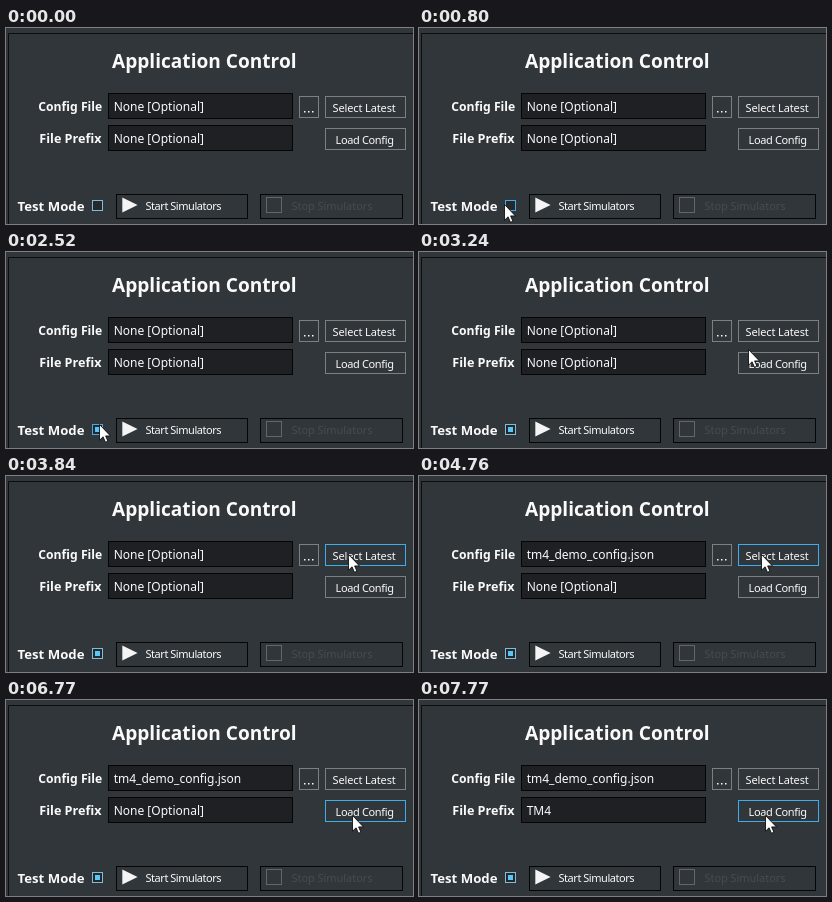
An HTML page that plays this animation: 407 px wide and 196 px high, repeating every 8 s.

```html
<!DOCTYPE html>
<html lang="en">
<head>
<meta charset="utf-8">
<title>Application Control</title>
<style>
html, body { margin: 0; width: 100%; height: 100%; overflow: hidden; background: #31363b; }
svg { display: block; width: 100%; height: 100%; }
text { font-family: "Noto Sans", "Open Sans", sans-serif; fill: #fafafa; white-space: pre; }
.label { font-weight: 700; }
.field { fill: #1e2023; stroke: #050506; }
.button { fill: #31363b; stroke: #7d8083; }
.dark { fill: #31363b; stroke: #050506; }
.hover { stroke: #3daee9; }
</style>
</head>
<body>
<svg viewBox="0 0 407 196" preserveAspectRatio="none">
  <rect width="407" height="196" fill="#31363b"/>
  <path d="M2.5 196V5.5H407" fill="none" stroke="#0c0d0e"/>

  <text class="label" x="106" y="40" font-size="19.1">Application Control</text>
  <text class="label" x="32.3" y="83" font-size="12.2">Config File</text>
  <text class="label" x="33.3" y="115" font-size="12.6">File Prefix</text>
  <text class="label" x="11.5" y="183" font-size="13.2">Test Mode</text>

  <rect class="field" x="102.5" y="65.5" width="184" height="25"/>
  <rect class="field" x="102.5" y="97.5" width="184" height="25"/>
  <text id="config" x="107.7" y="83" font-size="12"></text>
  <text id="prefix" x="107.7" y="115" font-size="12"></text>

  <rect class="button" x="293.5" y="68.5" width="19" height="21"/>
  <path d="M298 83h1.5v1.5h-1.5zM302 83h1.5v1.5h-1.5zM306 83h1.5v1.5h-1.5z" fill="#fafafa"/>
  <rect id="select" class="button" x="319.5" y="68.5" width="80" height="21"/>
  <text id="selectText" x="326.5" y="84" font-size="11" letter-spacing="-.12">Select Latest</text>
  <rect id="load" class="button" x="319.5" y="100.5" width="80" height="21"/>
  <text id="loadText" x="329.5" y="116" font-size="11" letter-spacing="-.36">Load Config</text>

  <rect id="check" x="86.5" y="172.5" width="10" height="10" fill="#25292c" stroke="#7fbcd9"/>
  <rect id="mark" x="89" y="175" width="5" height="5" fill="#5cc3f2"/>

  <rect class="dark" x="110.5" y="166.5" width="131" height="24"/>
  <path d="M116.3 169.4L131.6 177 116.3 184.6Z" fill="#f4f4f4"/>
  <text x="139.5" y="182" font-size="11" letter-spacing="-.46">Start Simulators</text>
  <rect class="dark" x="254.5" y="166.5" width="142" height="24"/>
  <rect x="260.5" y="169.5" width="15" height="15" fill="none" stroke="#63666a"/>
  <text x="285.5" y="182" font-size="11" letter-spacing="-.05" style="fill:#484c4f">Stop Simulators</text>

  <path id="cursor" d="M.5 .5V16.2L4.1 12.8 6.4 18.2 8.9 17.2 6.6 11.9H11.4Z"
        fill="#fff" stroke="#000" stroke-width=".8"/>
  <circle id="halo" r="12" fill="#ff0" fill-opacity=".47"/>
</svg>
<script>
const LOOP = 8000;
const $ = id => document.getElementById(id);
const show = (id, on) => $(id).setAttribute("visibility", on ? "visible" : "hidden");
const smooth = p => p * p * (3 - 2 * p);
const slow = p => 1 - (1 - p) ** 2;

// Cursor moves: start, end, steps, from, to, easing
const moves = [
  [500, 800, 4, [85, 193], [85, 176], slow],
  [900, 900, 1, [87, 175], [87, 175], slow],
  [1200, 1300, 2, [89, 175], [90, 175], slow],
  [2520, 3240, 8, [93, 172], [329, 97], smooth],
  [3340, 3840, 6, [331, 93], [342, 78], slow],
  [6050, 6570, 6, [343, 81], [344, 114], smooth],
  [6770, 6770, 1, [346, 115], [346, 115], slow]
];
const clicks = [[1820, 1920], [4540, 4760], [7670, 7770]];

// The pointer is sampled at about ten positions a second
function pointer(t) {
  const move = moves.filter(m => t >= m[0]).pop();
  if (!move) return null;
  const [start, end, steps, a, b, ease] = move;
  const last = steps - 1;
  const gap = last ? (end - start) / last : 1;
  const k = Math.min(last, Math.floor((t - start) / gap + 1e-6));
  const p = last ? ease(k / last) : 1;
  return a.map((v, i) => Math.round(v + (b[i] - v) * p));
}

function inside(point, id) {
  if (!point) return false;
  const r = $(id), n = name => +r.getAttribute(name);
  const dx = point[0] - n("x"), dy = point[1] - n("y");
  return dx >= -1.5 && dy >= -0.5 && dx <= n("width") + 0.5 && dy <= n("height") + 0.5;
}

function draw(t) {
  const at = pointer(t);
  const pressed = clicks.some(([a, b]) => t >= a && t < b);
  show("cursor", at);
  show("halo", pressed);
  if (at) {
    const shift = `translate(${at})`;
    $("cursor").setAttribute("transform", shift);
    $("halo").setAttribute("transform", shift);
  }
  for (const id of ["check", "select", "load"])
    $(id).classList.toggle("hover", inside(at, id));
  for (const id of ["select", "load"])
    $(id + "Text").setAttribute("transform", pressed && inside(at, id) ? "translate(1 1)" : "");
  show("mark", t >= 1920);
  $("config").textContent = t < 4760 ? "None [Optional]" : "tm4_demo_config.json";
  $("prefix").textContent = t < 7770 ? "None [Optional]" : "TM4";
}

const began = performance.now();
function tick() {
  draw((performance.now() - began) % LOOP);
  requestAnimationFrame(tick);
}
tick();
</script>
</body>
</html>
```
